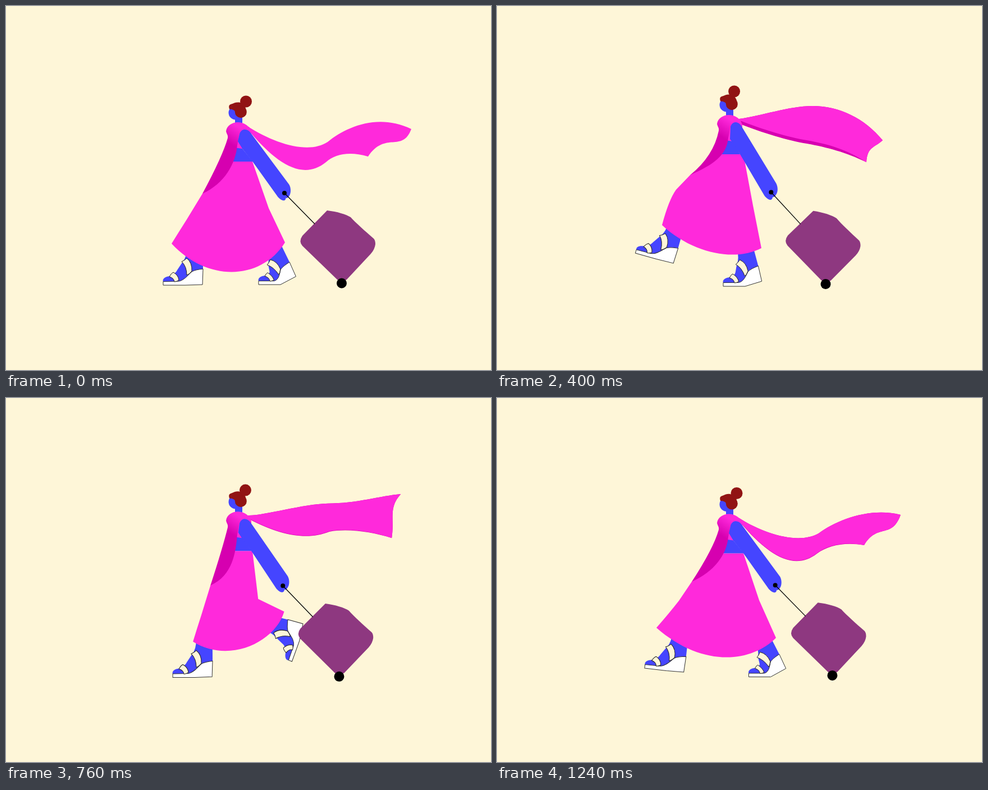
An HTML page with a canvas for the animation above (1280 ms loop, 864 by 648 pixels).

```html
<!DOCTYPE html>
<html lang="en">
<head>
<meta charset="utf-8">
<title>Walking with a suitcase</title>
<style>
html, body { margin: 0; height: 100%; overflow: hidden; background: #fef6d8; }
canvas { display: block; }
</style>
</head>
<body>
<canvas id="stage" width="864" height="648"></canvas>
<script>
const ctx = document.getElementById('stage').getContext('2d');
const LOOP = 1280, STRIDE = 640, TICK = 40;
const CREAM = '#fef6d8', PINK = '#ff29db', MAGENTA = '#d600b0', BLUE = '#4545ff',
      PURPLE = '#8e3880', HAIR = '#911414';

// Poses are keyed by time in ms.
// Foot: toe x, toe y, angle, bend of the sole.
const footKeys = {
  0: '280,497 0 0', 160: '304.5,497 0 0', 240: '334.5,497.5 0 0', 320: '368,498 0 4',
  400: '403,499 0 15', 600: '448.5,496.5 0 27', 640: '450,496 0 26', 720: '492,483 -48 14',
  800: '514,459 -84 0', 880: '453,478 -66 0', 960: '345,466 -22 0', 1040: '246.5,440 15.6 0',
  1120: '218,446 15 0', 1240: '263,481 6.5 0'
};
// Skirt: right knee, hem, left knee, tip of the front flap.
const skirtKeys = {
  0: 'L468,360 L497,421 C455,488 360,493 295,423 Q308,402 322,380 L350,334',
  160: 'L446,358 L495,374 C482,422 405,468 340,434 Q346,408 352,383 L366,331',
  240: 'L462,365 L493,412 C445,455 370,463 316,418 Q321,382 327,345 L350,311',
  400: 'L456,355 L471,431 C425,455 350,442 294,390 Q306,345 319,327 L344,301',
  500: 'L462,357 L487,432 C440,466 350,468 258,391 Q280,362 305,342 L342,313',
  600: 'L467,360 L497,427 C452,472 365,480 284,409 Q306,384 324,361 L347,327'
};
const scarfTopKeys = {
  0: 'M430,214 C480,246 540,264 573,242 C605,216 662,190 722,219',
  160: 'M431,208 C460,212 530,212 580,212 C620,205 665,212 696,253',
  400: 'M431,201 C470,196 520,178 562,178 C610,178 655,200 687,239',
  640: 'M431,214 C460,210 530,172 585,172 C630,175 670,170 699,190',
  880: 'M431,202 C460,210 530,210 562,207 C620,202 665,182 707,157',
  1040: 'M431,202 C480,224 550,230 585,220 C630,205 675,182 711,155',
  1240: 'M430,213 C480,245 540,260 573,241 C605,217 665,194 719,208'
};
const scarfEndKeys = {
  0: 'C706,262 676,222 645,268', 160: 'C685,277 660,250 645,284',
  400: 'C672,253 660,250 658,278', 640: 'C672,212 678,235 684,267',
  880: 'C690,185 707,195 687,231', 1040: 'C698,180 713,185 686,225',
  1240: 'C703,252 678,222 654,262'
};
const scarfLowKeys = {
  0: 'C612,258 585,264 570,278 C530,310 485,285 431,220',
  160: 'C620,272 585,269 555,269 C510,275 475,240 433,217',
  400: 'C620,260 590,252 552,245 C520,240 470,225 433,210',
  640: 'C650,250 610,234 575,233 C545,240 490,238 434,221',
  880: 'C650,227 605,232 575,246 C530,269 495,256 431,208',
  1040: 'C650,225 610,235 580,254 C535,289 490,260 431,207',
  1240: 'C620,256 590,262 570,277 C530,308 485,283 431,219'
};
const foldKeys = { 0: '0', 160: '5', 400: '6', 640: '0', 880: '2.5', 1040: '3.5', 1240: '0.8' };
const bunKeys = {
  0: '427.5,170', 160: '426,161.5', 240: '424.8,153', 320: '423.5,146', 400: '422.6,152', 600: '427,169.5'
};
const armLow = 'M416,228 C419,217.5 430,217.5 436,226 L504.5,318 C508,324 508,334 504,339 C502,342 499,343 498.5,341 ' +
  'C499,345 496,347 493,346 C489,345 485,341 483,338 L440,278 L421,254 L413,241 Z';
const armHigh = 'M416,215 C419,204.5 430,204.5 435.5,214 L497.5,316 C500.5,322 501,331 497,336 C495,340 492,341 491,340 ' +
  'C491,343 489,345.5 486,345 C482,344 478,340 476,337 L433,264 L419,242 L415,237 Z';

const mod = (a, n) => ((a % n) + n) % n;
const nums = text => text.match(/-?[\d.]+/g).map(Number);
const refill = (text, values) => { let i = 0; return text.replace(/-?[\d.]+/g, () => values[i++].toFixed(2)); };
const blend = (a, b, k) => { const q = nums(b); return refill(a, nums(a).map((v, i) => v + (q[i] - v) * k)); };
const mapPoints = (path, fn) => path.replace(/(-?[\d.]+),(-?[\d.]+)/g, (_, x, y) => fn(+x, +y).map(v => v.toFixed(2)).join());

// Periodic smooth curve through the keyed poses.
function tween(keys, period, time) {
  const times = Object.keys(keys).map(Number), n = times.length;
  const t = mod(time, period);
  const i = times.filter(k => k <= t).length - 1;
  const at = j => times[mod(j, n)] + Math.floor(j / n) * period;
  const [a, b, c, d] = [-1, 0, 1, 2].map(o => nums(keys[times[mod(i + o, n)]]));
  const span = at(i + 1) - at(i), u = (t - at(i)) / span;
  return refill(keys[times[0]], b.map((v, j) => {
    const m0 = (c[j] - a[j]) / (at(i + 1) - at(i - 1)) * span;
    const m1 = (d[j] - v) / (at(i + 2) - at(i)) * span;
    const rise = c[j] - v;
    return v + u * (m0 + u * (3 * rise - 2 * m0 - m1 + u * (m0 + m1 - 2 * rise)));
  }));
}

function fill(path, color, outline) {
  const p = new Path2D(path);
  ctx.fillStyle = color;
  ctx.fill(p);
  if (outline) { ctx.strokeStyle = outline; ctx.lineWidth = 1; ctx.stroke(p); }
}
function dot(x, y, r, color) {
  ctx.beginPath();
  ctx.arc(x, y, r, 0, 2 * Math.PI);
  ctx.fillStyle = color;
  ctx.fill();
}
function placed(x, y, angle, draw) {
  ctx.save();
  ctx.translate(x, y);
  ctx.rotate(angle * Math.PI / 180);
  draw();
  ctx.restore();
}

function drawFoot(time) {
  const [x, y, angle, bend] = nums(tween(footKeys, LOOP, time));
  // The heel turns about the ball of the foot, the toes stay flat.
  const flex = path => mapPoints(path, (px, py) => {
    const a = -bend * Math.PI / 180 * Math.max(0, Math.min(1, (px - 0.8 * py - 30) / 35));
    const c = Math.cos(a), s = Math.sin(a), dx = px - 39;
    return [39 + dx * c - py * s, dx * s + py * c];
  });
  placed(x, y, angle, () => {
    fill(flex('M42,-68 L71,-68 L71,-28 L46,-14 L28,-5 L0,-6 C-2,-11 3,-15 11,-16 C16,-17 22,-21 25,-27 L35,-42 Q42,-50 42,-68 Z'), BLUE);
    fill(flex('M0,0 L39,0 L70,-1 L71,-29 C63,-28 56,-27 51,-24 C44,-18 38,-9 28,-7 L0,-6.5 Z'), '#fff', '#333');
    fill(flex('M33,-42 Q38,-44 42,-48 Q52,-40 51,-25 Q46,-19 42,-18 Q42,-33 33,-42 Z'), CREAM, '#222');
    fill(flex('M11,-15 Q14,-21 18,-23 Q27,-18 28,-9 Q24,-6 20,-6 Q19,-13 11,-15 Z'), CREAM, '#222');
  });
}

function drawScarf(time) {
  const top = tween(scarfTopKeys, LOOP, time) + tween(scarfEndKeys, LOOP, time);
  const low = tween(scarfLowKeys, LOOP, time);
  const fold = Math.max(0, nums(tween(foldKeys, LOOP, time))[0]);
  if (fold > 0.3) fill(top + low + 'Z', MAGENTA);
  fill(top + mapPoints(low, (x, y) => [x, y - fold]) + 'Z', PINK);
}

function drawHead(time, lift) {
  placed(0, lift * 1.08, 0, () => {
    ctx.fillStyle = BLUE;
    ctx.fillRect(408, 190, 13, 24);
    dot(409, 190, 12.5, BLUE);
    fill('M398,183.5 C396.5,179 397,176 401,174.8 C406,173 409,171 415,171.5 C422,172 427,178 428,187 L408,189 C408,185.5 404,184 398,183.5 Z', HAIR);
    dot(418.3, 188.7, 10.5, HAIR);
  });
  dot(...nums(tween(bunKeys, STRIDE, time)), 10.5, HAIR);
}

function drawBody(time, lift, swing) {
  const skirt = tween(skirtKeys, STRIDE, time);
  const [tipX, tipY] = nums(skirt).slice(-2);
  fill(`M393,${277 + lift} L439,${277 + lift} ${skirt} Z`, PINK);
  placed(0, lift, 0, () => {
    const tip = tipY - lift;
    const shade = ctx.createLinearGradient(414, 215, 396, 243);
    shade.addColorStop(0, PINK);
    shade.addColorStop(1, MAGENTA);
    fill('M405,215 L433,215 L437,224 L437,240 L421,255 L403,255 Z', PINK);
    fill(`M399,251 L421,254 L${440 - 7 * swing},277 L399,277 Z`, BLUE);
    fill(`M392,223 C393,213 403,207 413,207 C422,207 428,211 432,215 L418,222 C414,232 414,240 412,248
      C409,280 ${tipX + 40},${tip - 18} ${tipX},${tip} Q386,${267 - lift} 395,235 C396,230 393,228 392,223 Z`, shade);
  });
  fill(blend(armLow, armHigh, swing), BLUE);
}

function drawCase(rise) {
  placed(496 - 9 * rise, 333 + 7.3 * rise - 10.6 * rise * rise, 2 * rise, () => {
    ctx.translate(-496, -333);
    fill('M572,364 C590,366 606,371 614,376 C622,385 640,401 655,414 Q658,417 658,424 Q657,433 650,441 L607,487 ' +
      'Q598,493 590,487 L528,427 Q521,419 528,409 Z', PURPLE);
    ctx.beginPath();
    ctx.moveTo(496, 333);
    ctx.lineTo(550, 388);
    ctx.strokeStyle = '#000';
    ctx.lineWidth = 1.3;
    ctx.stroke();
    dot(598, 493.5, 9, '#000');
    dot(496, 333, 4, '#000');
  });
}

function draw(time) {
  const rise = (1 - Math.cos(2 * Math.PI * time / STRIDE)) / 2;
  const lift = -15.2 * rise, swing = rise / 0.854;
  ctx.fillStyle = CREAM;
  ctx.fillRect(0, 0, 864, 648);
  drawScarf(time);
  drawHead(time, lift);
  drawFoot(time + STRIDE);
  drawFoot(time);
  drawBody(time, lift, swing);
  drawCase(rise);
}

const start = performance.now();
function loop() {
  const time = (performance.now() - start) % LOOP;
  draw(Math.floor(time / TICK) * TICK);
  requestAnimationFrame(loop);
}
loop();
</script>
</body>
</html>
```
